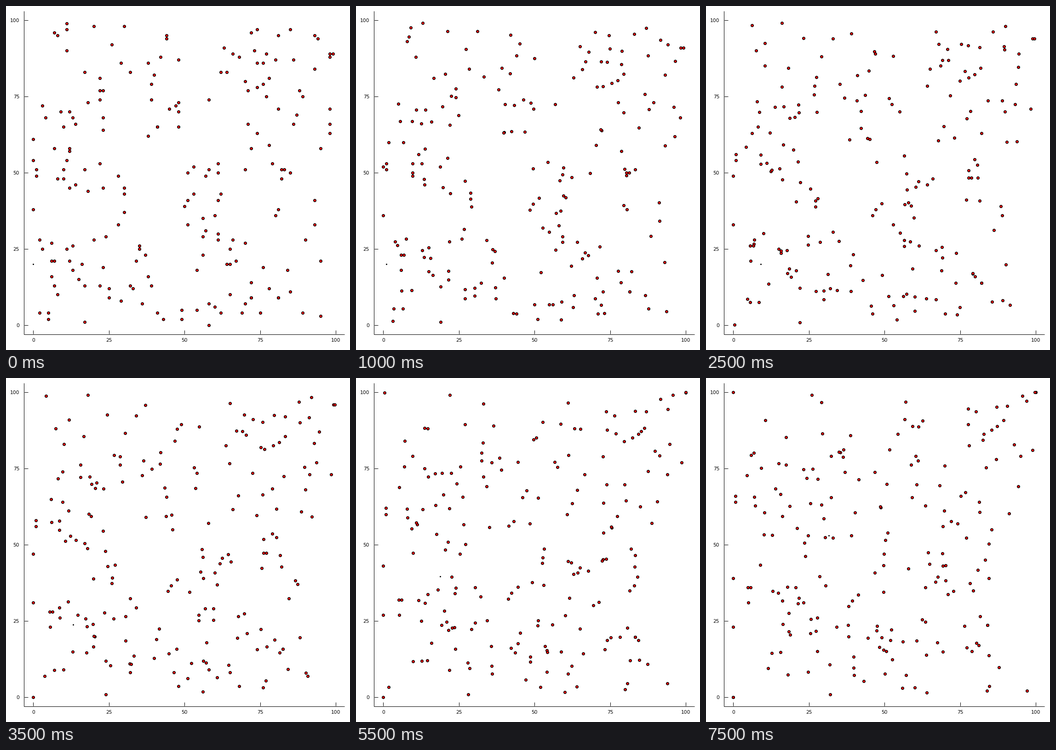
Animation of 748x749 px, one loop 8 s. Source, as a matplotlib script:

```python
import numpy as np
import matplotlib.pyplot as plt
from matplotlib.animation import FuncAnimation

W, H, DPI = 748, 749, 100
PX = 72 / DPI  # points per pixel
STEPS, INTERVAL = 16, 500

# Starting places of the outer agents, grouped by the corner they walk to
OUTER = {
    (0, 0): [(0, 38), (0, 54), (5, 2), (8, 95), (11, 90), (29, 86), (17, 83),
             (39, 79), (93, 95), (98, 88), (98, 63), (93, 41), (95, 21),
             (75, 4), (88, 77), (58, 74)],
    (100, 0): [(17, 1), (44, 94), (20, 98), (30, 98), (7, 96), (26, 92),
               (38, 86), (32, 83), (74, 97), (94, 94), (93, 84), (62, 83),
               (0, 61), (2, 28), (41, 4), (49, 2), (69, 4), (89, 75), (4, 68)],
    (0, 100): [(11, 97), (1, 51), (1, 49), (44, 95), (72, 96), (98, 71),
               (95, 58), (93, 33), (90, 28), (95, 3), (89, 4), (6, 21),
               (7, 21), (60, 6)],
    (100, 100): [(11, 99), (98, 89), (99, 89), (42, 88), (48, 87), (40, 82),
                 (85, 97), (98, 66), (86, 87), (58, 0), (3, 72), (3, 25),
                 (2, 4), (5, 4), (43, 2)],
}

# Random crowds: x range, y range, head count
CROWDS = [
    (7, 23, 43, 74, 22), (62, 81, 75, 96, 16), (30, 48, 61, 74, 9),
    (21, 23, 77, 81, 3), (66, 87, 46, 71, 13), (50, 62, 27, 59, 16),
    (28, 30, 33, 54, 5), (6, 39, 6, 32, 27), (47, 85, 4, 32, 25),
    (76, 86, 35, 41, 2),
]

# Step, x and y of the small black walker's turning points
WALK_T = [0, 2, 5, 7, 9, 11, 15]
WALK_X = [0, 1, 9, 13.2, 15, 18.8, 31.6]
WALK_Y = [20, 20, 20, 23.7, 30.5, 39.6, 53]


def to_px(x, y):
    return 59.4 + 6.577 * np.asarray(x), 694.8 - 6.638 * np.asarray(y)


def populate():
    rng = np.random.default_rng(12)
    corners = list(OUTER)
    start = [p for group in OUTER.values() for p in group]
    goal = [c for c, group in OUTER.items() for _ in group]
    for x0, x1, y0, y1, n in CROWDS:
        for _ in range(n):
            start.append((rng.integers(x0, x1 + 1), rng.integers(y0, y1 + 1)))
            goal.append(corners[rng.integers(4)])
    return np.array(start, float), np.array(goal, float)


START, GOAL = populate()
PATH = GOAL - START
LENGTH = np.hypot(*PATH.T)[:, None]


def agents(step):
    """One unit per step straight to the corner, then stay there."""
    return START + PATH * np.minimum(step / LENGTH, 1)


fig = plt.figure(figsize=(W / DPI, H / DPI), dpi=DPI, facecolor="white")
ax = fig.add_axes([0, 0, 1, 1])
ax.set(xlim=(0, W), ylim=(H, 0))
ax.axis("off")


def rule(xs, ys):
    ax.plot(xs, ys, color="black", lw=PX, solid_capstyle="butt")


rule([39.5, 39.5], [11, 715])
rule([39, 736], [714.5, 714.5])
font = dict(family="DejaVu Sans", size=10.67 * PX, color="black")
for v in range(0, 101, 25):
    tx, ty = to_px(v, v)
    rule([tx, tx], [714, 706])
    rule([40, 48], [ty, ty])
    ax.text(tx, 727, str(v), ha="center", va="center_baseline", **font)
    ax.text(29, ty, str(v), ha="right", va="center_baseline", **font)

dots, = ax.plot([], [], "o", ms=5.6 * PX, mfc="red", mec="black",
                mew=1.4 * PX, zorder=3)
walker, = ax.plot([], [], "o", ms=3 * PX, color="black", mew=0, zorder=4)


def update(step):
    dots.set_data(*to_px(*agents(step).T))
    walker.set_data(*to_px([np.interp(step, WALK_T, WALK_X)],
                           [np.interp(step, WALK_T, WALK_Y)]))
    return dots, walker


anim = FuncAnimation(fig, update, frames=STEPS, interval=INTERVAL,
                     repeat=True, repeat_delay=0)
plt.show()
```
